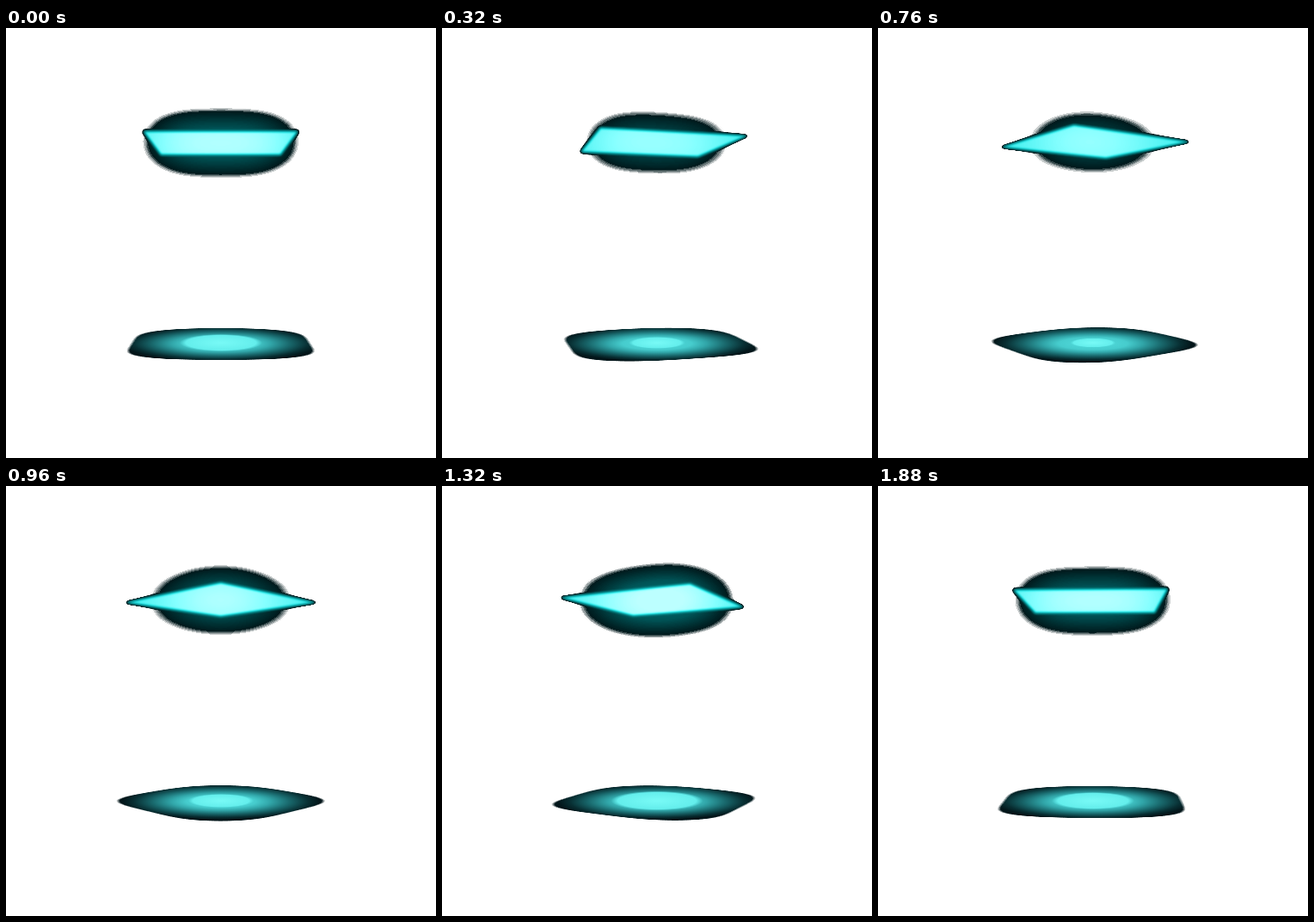
An HTML page for the animation above (1.92 s loop, 500 by 500 pixels).

```html
<!DOCTYPE html>
<html lang="en">
<head>
<meta charset="utf-8">
<title>Hovering plate</title>
<style>
  html, body { margin: 0; width: 100%; height: 100%; overflow: hidden; background: #fff; }
  svg { display: block; width: 100vw; height: 100vh; }
</style>
</head>
<body>
<svg viewBox="0 0 500 500">
  <defs>
    <!-- wide halo + crisp plate, summed into one level and coloured through a ramp -->
    <filter id="glow" filterUnits="userSpaceOnUse" x="0" y="0" width="500" height="300" color-interpolation-filters="sRGB">
      <feGaussianBlur in="SourceGraphic" stdDeviation="30 27" result="wide"/>
      <feGaussianBlur in="SourceGraphic" stdDeviation="1.5" result="tight"/>
      <feComposite id="mix" in="tight" in2="wide" operator="arithmetic" k1="0" k2=".75" k3=".6" k4="0"/>
      <feColorMatrix values="0 0 0 1 0  0 0 0 1 0  0 0 0 1 0  0 0 0 50 -4.1"/>
      <feComponentTransfer>
        <feFuncR type="table" tableValues="0 0 0 .01 .03 .06 .1 .17 .3 .52 .74"/>
        <feFuncG type="table" tableValues=".03 .1 .33 .45 .55 .65 .76 .87 .95 1 1"/>
        <feFuncB type="table" tableValues=".04 .11 .34 .46 .56 .66 .77 .87 .95 1 1"/>
      </feComponentTransfer>
    </filter>
    <filter id="spread" filterUnits="userSpaceOnUse" x="0" y="250" width="500" height="250" color-interpolation-filters="sRGB">
      <feGaussianBlur stdDeviation="40 4.3"/>
      <feColorMatrix values="0 0 0 0 1  0 0 0 0 1  0 0 0 0 1  0 0 0 30 -7.6"/>
    </filter>
    <mask id="pool" maskUnits="userSpaceOnUse" x="0" y="250" width="500" height="250">
      <polygon id="floor" fill="#fff" filter="url(#spread)"/>
    </mask>
    <radialGradient id="teal">
      <stop offset="0" stop-color="#54dede"/>
      <stop offset=".35" stop-color="#46cccd"/>
      <stop offset=".5" stop-color="#31a6a9"/>
      <stop offset=".7" stop-color="#18666a"/>
      <stop offset=".88" stop-color="#082f33"/>
      <stop offset="1" stop-color="#03161a"/>
    </radialGradient>
    <radialGradient id="pale">
      <stop offset="0" stop-color="#78faf6"/>
      <stop offset=".85" stop-color="#64eeec"/>
      <stop offset="1" stop-color="#58e2e2" stop-opacity="0"/>
    </radialGradient>
  </defs>
  <polygon id="plate" filter="url(#glow)"/>
  <g mask="url(#pool)">
    <rect y="300" width="500" height="150" fill="#03161a"/>
    <ellipse cx="250" cy="367" rx="115" ry="20.5" fill="url(#teal)"/>
    <ellipse id="core" cx="250" cy="366" fill="url(#pale)"/>
  </g>
</svg>
<script>
const LOOP = 1920, STEP = 40;
const DIST = 7.94, FOCAL = 621, HORIZON = 241;
// glow strength, eased between its turning points: [ms, level]
const PULSE = [[0, 1], [580, .63], [1320, 1.08], [LOOP, 1]];
const el = id => document.getElementById(id);

function level(ms) {
  const i = PULSE.findIndex(p => p[0] > ms);
  const [t0, a] = PULSE[i - 1], [t1, b] = PULSE[i];
  return a + (b - a) * (1 - Math.cos(Math.PI * (ms - t0) / (t1 - t0))) / 2;
}

// Perspective outline of a turned square; lift < 0 is above the horizon.
function square(turn, lift) {
  return [0, 1, 2, 3].map(i => {
    const a = turn + (i + .5) * Math.PI / 2;
    const z = DIST + Math.SQRT2 * Math.sin(a);
    const x = 249.7 + FOCAL * Math.SQRT2 * Math.cos(a) / z;
    return x.toFixed(2) + "," + (HORIZON + lift / z).toFixed(2);
  }).join(" ");
}

function draw() {
  const ms = Math.floor(performance.now() / STEP) * STEP % LOOP;
  const b = level(ms);
  const turn = ms / LOOP * Math.PI / 2;
  el("plate").setAttribute("points", square(turn, -838));
  el("floor").setAttribute("points", square(turn, 988));
  el("mix").setAttribute("k3", .6 * b);
  const r = 48 + 70 * (b - 1);
  el("core").setAttribute("rx", r);
  el("core").setAttribute("ry", r * .21);
  requestAnimationFrame(draw);
}
draw();
</script>
</body>
</html>
```
